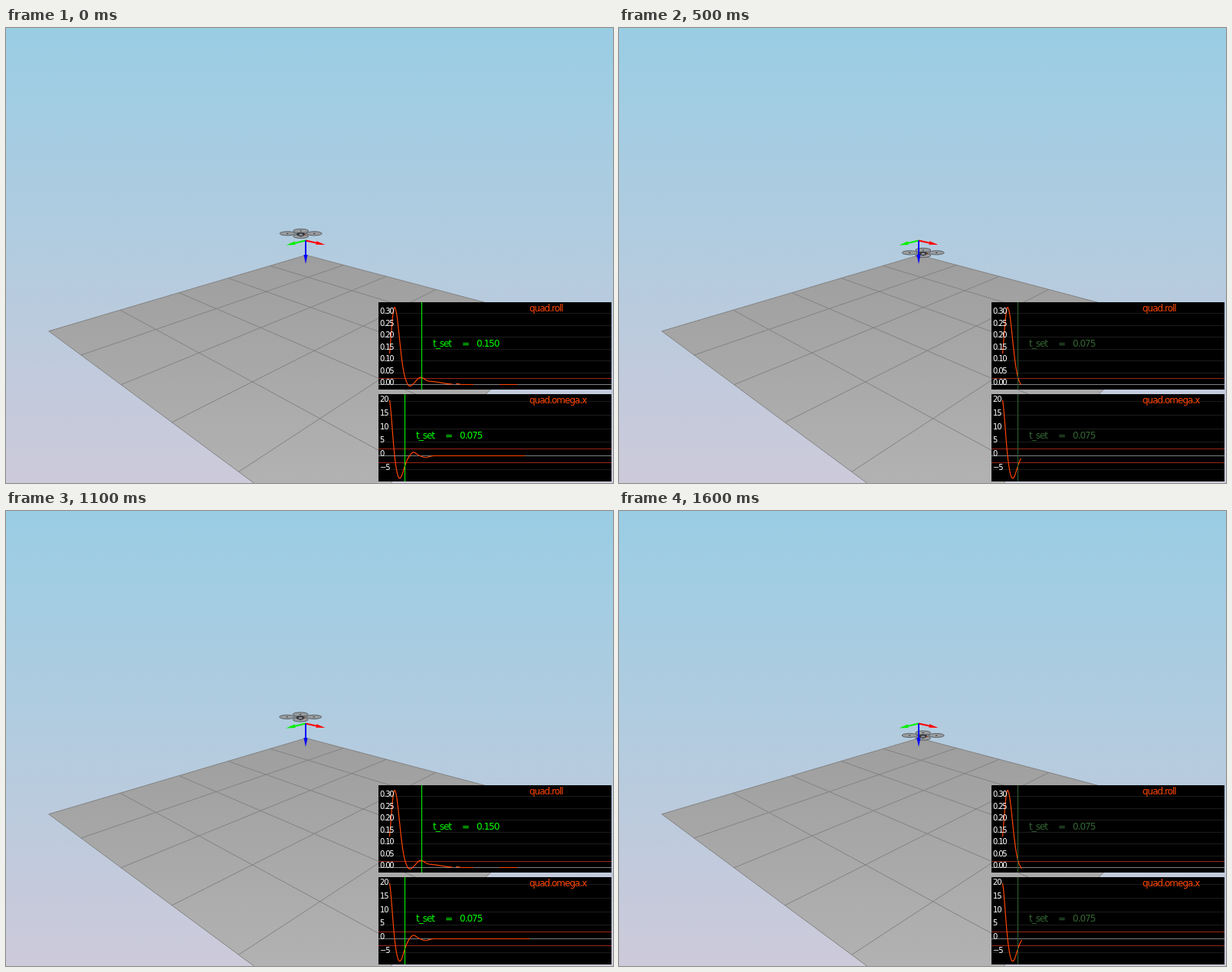
An HTML page with a canvas that plays this animation: 792 by 594 pixels, repeating every 1700 ms.

```html
<!DOCTYPE html>
<html lang="en">
<head>
<meta charset="utf-8">
<title>Quadrotor attitude plots</title>
<style>
  html, body { margin: 0; width: 100%; height: 100%; overflow: hidden; }
  canvas { display: block; }
</style>
</head>
<body>
<canvas id="stage" width="792" height="594"></canvas>
<script>
const ctx = document.getElementById('stage').getContext('2d');
const LOOP = 1700, STEP = 100;
const RED = '#ff4500', GREEN = '#00ff00', DIM = '#336633', LIMIT = '#992418';

// Every run follows the same motion; only its age at its first step differs.
const runs = [{ from: 0, age: 5.75 }, { from: 5, age: 0 }, { from: 15, age: -0.95 }];

function runAge(step) {
  const run = runs.findLast(r => r.from <= step);
  return run.age + step - run.from;
}

const plotX = age => 524 + 25 * age + 0.25 * age * age;
const droneX = age => 396.8 - 2.1 * age;

function droneY(age) {
  const d = age - 5.4; // distance from the top of the flight
  return 268 + (d < 0 ? 2.02 * (-d) ** 1.5 : 2.4 * d * d);
}

function rect(x, y, w, h, color) {
  ctx.fillStyle = color;
  ctx.fillRect(x, y, w, h);
}

function path(points, color, width = 1) {
  ctx.beginPath();
  points.forEach(([x, y]) => ctx.lineTo(x, y));
  ctx.strokeStyle = color;
  ctx.lineWidth = width;
  ctx.stroke();
}

function polygon(points, fill) {
  ctx.beginPath();
  points.forEach(([x, y]) => ctx.lineTo(x, y));
  ctx.closePath();
  ctx.fillStyle = fill;
  ctx.fill();
}

function text(str, x, y, color, size = 12, spacing = -1) {
  ctx.font = `${size}px "DejaVu Sans", sans-serif`;
  ctx.letterSpacing = spacing + 'px';
  ctx.fillStyle = color;
  ctx.fillText(str, x, y);
}

function verticalGradient(y0, y1, from, to) {
  const g = ctx.createLinearGradient(0, y0, 0, y1);
  g.addColorStop(0, from);
  g.addColorStop(1, to);
  return g;
}

// Perspective of floor cell (u, v), counted from the far corner.
function floorPoint(u, v) {
  const d = 1 - 0.0698 * u - 0.0627 * v;
  return [(391.5 - 71.04 * u + 21.3 * v) / d, (296.5 - 7.77 * u - 6.45 * v) / d];
}

function drawScene() {
  rect(0, 0, 792, 594, verticalGradient(0, 594, '#99cde4', '#cdcada'));
  const corners = [[0, 0], [5, 0], [5, 5], [0, 5]].map(c => floorPoint(...c));
  polygon(corners, verticalGradient(296, 594, '#9e9e9e', '#b2b2b2'));
  for (let i = 0; i <= 5; i++) {
    path([floorPoint(i, 0), floorPoint(i, 5)], '#828282');
    path([floorPoint(0, i), floorPoint(5, i)], '#828282');
  }
}

function arrow(dx, dy, half, color) {
  const x = 391, y = 277.5, len = Math.hypot(dx, dy);
  const bx = x + dx * (1 - 12 / len), by = y + dy * (1 - 12 / len);
  const nx = -dy / len * half, ny = dx / len * half;
  path([[x, y], [bx, by]], color, 2);
  polygon([[bx + nx, by + ny], [x + dx, y + dy], [bx - nx, by - ny]], color);
}

function ellipse(x, y, rx, ry, fill, stroke) {
  ctx.beginPath();
  ctx.ellipse(x, y, rx, ry, 0, 0, 2 * Math.PI);
  ctx.fillStyle = fill;
  ctx.fill();
  if (stroke) {
    ctx.strokeStyle = stroke;
    ctx.lineWidth = 0.8;
    ctx.stroke();
  }
}

function drawDrone(x, y) {
  for (const [dx, dy] of [[0, -3.4], [-17.5, 0], [17.5, 0], [0, 3.6]]) {
    path([[x, y], [x + dx, y + dy]], '#555');
    ellipse(x + dx, y + dy, 10, 2.6, '#999da0', '#484b4e');
    rect(x + dx - 1, y + dy - 0.5, 2, 1, '#222');
  }
  ellipse(x, y + 1, 5.5, 2.6, '#333336');
  ellipse(x, y + 1.4, 2.6, 1.2, '#8d93a0');
  rect(x + 4, y + 1, 3, 1, '#a5452a');
}

// A curve is a sum of bumps: height, centre, left width, right width.
// Past settledFrom it shows only where a slow ripple exceeds rippleCut.
const panels = [
  {
    title: 'quad.roll', top: 358, zero: 465, gap: 15.45, unit: 0.05, low: 0, high: 6, digits: 2,
    band: 7.7, settle: 542, time: '0.150', confirmed: 570, settledFrom: 582, rippleCut: 0.3,
    bumps: [[101, 506.5, 4.8, 6.3], [-3, 526, 3, 3], [8, 540, 5, 5], [4, 553, 9, 14]]
  },
  {
    title: 'quad.omega.x', top: 478, zero: 558, gap: 17.75, unit: 5, low: -1, high: 4, digits: 0,
    band: 9.2, settle: 520, time: '0.075', confirmed: 540, settledFrom: 556, rippleCut: -1,
    bumps: [[76, 499, 4, 4], [-29.5, 513, 5, 5.5], [4.7, 531, 3.5, 4], [-2.3, 547, 4, 4]]
  }
];

function curveY(p, x) {
  return p.bumps.reduce((y, [height, centre, left, right]) => {
    const z = (x - centre) / (x < centre ? left : right);
    return y - height * Math.exp(-z * z / 2);
  }, p.zero + 0.5);
}

function drawCurve(p, now) {
  const points = [];
  for (let x = 500; x <= Math.min(now, p.settledFrom); x++) points.push([x + 0.5, curveY(p, x)]);
  path(points, RED, 1.2);
  for (let x = p.settledFrom; x < now; x++) {
    const ripple = Math.cos((x - 598) / 57 * 2 * Math.PI);
    if (ripple >= p.rippleCut) rect(x, Math.floor(curveY(p, x) - 0.4), 1, 1, RED);
  }
}

function drawSettling(p, now) {
  if (now < 520) return;
  const early = now < p.settle;
  const x = early ? 520 : p.settle;
  const color = now >= p.confirmed ? GREEN : DIM;
  const y = p.top + 57.5;
  rect(x, p.top, 1, 114, color);
  text('t_set', x + 15, y, color);
  text('=', x + 53, y, color);
  text(early ? '0.075' : p.time, x + 72, y, color);
}

function drawPanel(p, now) {
  // The window passes after 0.75 s inside the band.
  const passed = now >= p.settle + 220;
  const upper = Math.round(p.zero - p.band), lower = Math.round(p.zero + p.band);
  ctx.save();
  ctx.beginPath();
  ctx.rect(486, p.top, 304, 114);
  ctx.clip();
  rect(486, p.top, 304, 114, '#000');
  for (let k = p.low; k <= p.high; k++) {
    rect(486, Math.round(p.zero - k * p.gap), 304, 1, k ? '#1c1c1c' : '#808080');
  }
  for (const y of [upper, lower]) rect(486, y, 304, 1, passed ? DIM : LIMIT);
  drawCurve(p, now);

  for (let k = p.low; k <= p.high; k++) {
    const label = (k * p.unit).toFixed(p.digits).replace('-', '−');
    text(label, 488, p.zero - k * p.gap + 1, '#fff', 10, -1.2);
  }
  text(p.title, 683, p.top + 12, RED);
  drawSettling(p, now);

  if (passed) {
    ctx.strokeStyle = GREEN;
    ctx.lineWidth = 1;
    ctx.strokeRect(p.settle + 2.5, upper + 0.5, 218, lower - upper);
  }
  ctx.restore();
}

function draw(ms) {
  const step = Math.floor(ms % LOOP / STEP);
  const age = runAge(step);
  const droneInFront = step < runs[1].from;
  const greenAxis = () => arrow(-25.5, 6, 2.3, '#00f000');

  drawScene();
  if (droneInFront) greenAxis();
  drawDrone(droneX(age), droneY(age));
  if (!droneInFront) greenAxis();
  arrow(25.5, 5.5, 2.3, '#ff0000');
  arrow(0, 30.5, 2.5, '#0000ff');

  const now = plotX(age);
  panels.forEach(p => drawPanel(p, now));
}

const start = performance.now();
function tick() {
  draw(performance.now() - start);
  requestAnimationFrame(tick);
}
tick();
</script>
</body>
</html>
```
